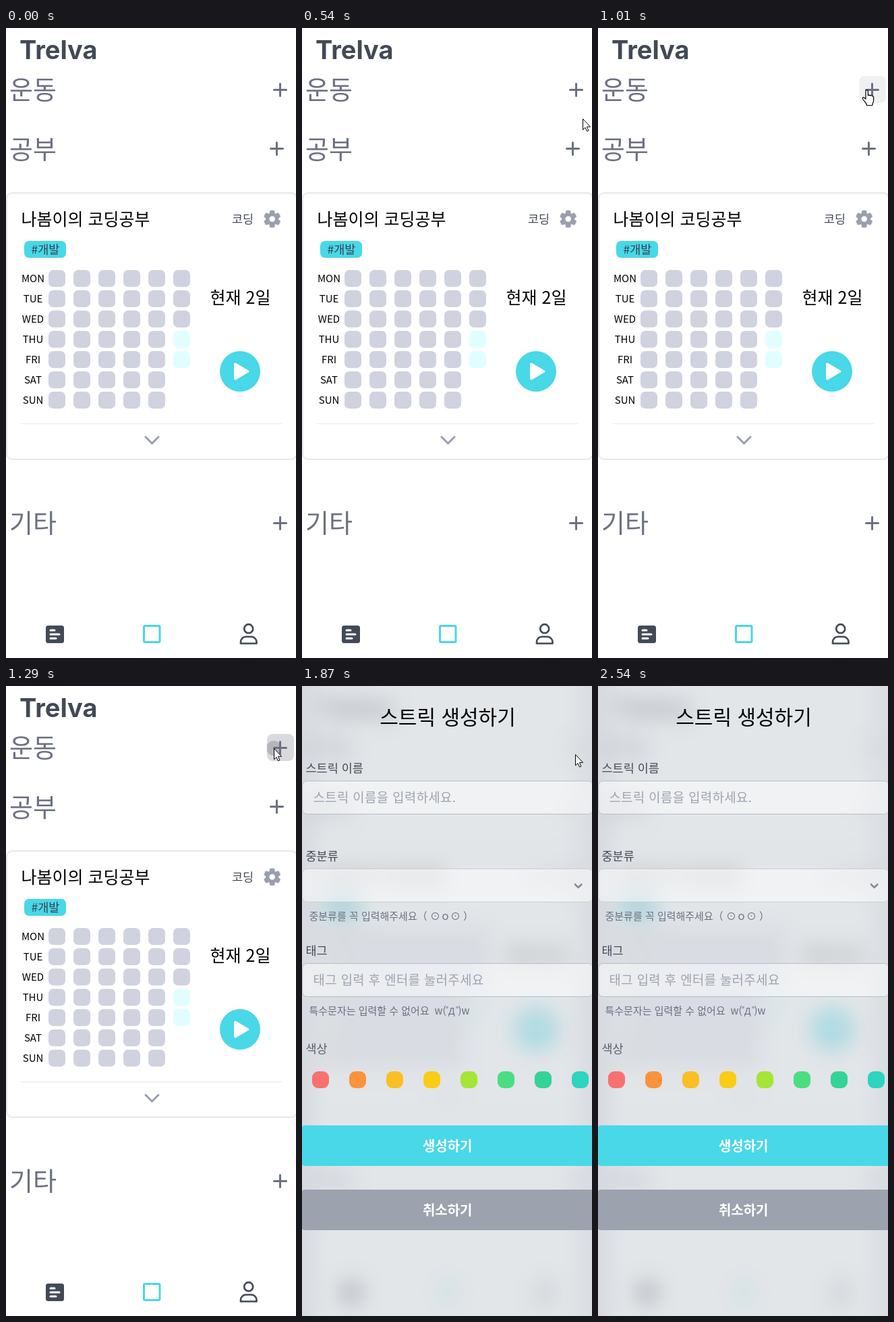
An HTML page for the animation above (3200 ms loop, 430x932 px).

```html
<!DOCTYPE html>
<html lang="ko">
<head>
<meta charset="utf-8">
<title>Trelva</title>
<style>
  html, body { margin: 0; width: 100%; height: 100%; overflow: hidden; background: #fff; }
  svg { display: block; width: 430px; height: 932px; }
  text { font-family: "Noto Sans CJK KR", "Noto Sans CJK", "Noto Sans", sans-serif; white-space: pre; }
  .brand { font-family: Inter, sans-serif; }
  .line { fill: none; stroke-linecap: round; stroke-linejoin: round; }
  .blurred { filter: blur(16px); }
</style>
</head>
<body>
<svg viewBox="0 0 430 932">
  <defs>
    <linearGradient id="edge">
      <stop offset="0" stop-color="#c8cbd4" stop-opacity=".45"/>
      <stop offset=".09" stop-color="#c8cbd4" stop-opacity="0"/>
      <stop offset=".9" stop-color="#c8cbd4" stop-opacity="0"/>
      <stop offset="1" stop-color="#c8cbd4" stop-opacity=".35"/>
    </linearGradient>
    <clipPath id="btn"><rect x="387" y="71" width="40" height="40" rx="8"/></clipPath>
  </defs>
  <g id="home"></g>
  <g id="form"></g>
  <g id="cursor" stroke="#000" stroke-linejoin="round" fill="#fff">
    <path id="arrow" d="M.5.5V16.6L4 13.3 6.5 18.8 8.9 17.8 6.5 12.2H11.6z"/>
    <path id="hand" stroke-width="1.2" d="M0 1.5a1.7 1.7 0 0 1 3.4 0V8a1.6 1.6 0 0 1 3 .3 1.6 1.6 0 0 1 3 .6 1.4 1.4 0 0 1 2.2 1V15c0 3-1.8 4-1.8 7.5H1.5c0-3-3-5-6-9.5-1-2 1-3.2 2.4-1.7L0 13z"/>
  </g>
</svg>
<script>
const $ = id => document.getElementById(id);
const CYAN = '#48d8e8', SLATE = '#6b7082', DARK = '#434956', MUTED = '#9a9fb0';

// Text is placed by the vertical centre of its glyphs.
const text = (x, mid, size, fill, str, more = '') =>
  `<text x="${x}" y="${mid + size * .37}" font-size="${size}" fill="${fill}" ${more}>${str}</text>`;
const rect = (x, y, w, h, r, fill, more = '') =>
  `<rect x="${x}" y="${y}" width="${w}" height="${h}" rx="${r}" fill="${fill}" ${more}/>`;
const line = (d, stroke, width) =>
  `<path class="line" d="${d}" stroke="${stroke}" stroke-width="${width}"/>`;
const plus = (x, y) => line(`M${x - 9} ${y}h18M${x} ${y - 9}v18`, SLATE, 3);
const middle = 'text-anchor="middle"';

function grid() {
  return ['MON', 'TUE', 'WED', 'THU', 'FRI', 'SAT', 'SUN'].map((day, row) => {
    const y = 358 + row * 30;
    let out = text(40, y + 12.5, 15, '#000', day, middle);
    for (let col = 0; col < (row < 5 ? 6 : 5); col++) {
      const fresh = col === 5 && row > 2;
      out += rect(63 + col * 37, y, 25, 25, 7, fresh ? '#e0feff' : '#d0d2df');
    }
    return out;
  }).join('');
}

const gear = `<g transform="translate(394.7 282.5)"><circle r="9.6" fill="${MUTED}"/>` +
  [0, 60, 120].map(a => rect(-3.8, -12.7, 7.6, 25.4, 2, MUTED, `transform="rotate(${a})"`)).join('') +
  '<circle r="4.2" fill="#fff"/></g>';

$('home').innerHTML =
  rect(-100, -100, 630, 1132, 0, '#fff') +
  `<text class="brand" x="20" y="45.5" font-size="38" font-weight="700" fill="${DARK}">Trelva</text>` +
  text(5, 91, 38, SLATE, '운동') + text(5, 179, 38, SLATE, '공부') + text(5, 732, 38, SLATE, '기타') +
  `<g id="press" clip-path="url(#btn)">${rect(387, 71, 40, 40, 8, '#f0f0f2', 'id="pad"')}` +
  '<circle id="ripple" cx="397" cy="92" fill="#b5b6ba"/></g>' +
  plus(406.5, 91.5) + plus(401.5, 178.5) + plus(406.5, 732.5) +
  rect(1, 244, 430, 394, 8, '#fff', 'stroke="#e5e7eb" stroke-width="2"') +
  text(22.5, 283, 25, '#000', '나봄이의 코딩공부', 'font-weight="500"') +
  text(335, 282.5, 17.5, DARK, '코딩') + gear +
  rect(27, 315, 62, 25, 7, CYAN) + text(37.5, 327.5, 17.5, '#374151', '#개발') +
  grid() +
  text(302.5, 398.5, 25, '#000', '현재 2일') +
  `<circle cx="347" cy="508" r="30" fill="${CYAN}"/>` +
  '<path d="M340 497.500V518.500L358 508z" fill="#fff" stroke="#fff" stroke-width="4" stroke-linejoin="round"/>' +
  rect(22, 585, 388, 1, 0, '#e5e7eb') +
  line('M207 605l9.500 9.500 9.500-9.500', MUTED, 3) +
  rect(59, 884, 27, 26, 3.5, DARK) + line('M66 891h6M66 897h13M66 903h8', '#fff', 3) +
  rect(204.5, 884.5, 23.5, 24, 1.5, 'none', `stroke="${CYAN}" stroke-width="3"`) +
  `<circle cx="359.7" cy="888.7" r="6.5" fill="none" stroke="${DARK}" stroke-width="2.7"/>` +
  line('M348 910.500v-2c0-5 4-8 8-8h7.500c4 0 8 3 8 8v2z', DARK, 2.7);

const field = (y, border) => rect(.5, y + .5, 431, 49, 7, '#fff', `fill-opacity=".5" stroke="${border}"`);
const button = (y, fill, label) => rect(0, y, 432, 60, 4, fill) +
  text(215.7, y + 30.5, 20, '#fff', label, middle + ' font-weight="700"');
const label = (y, str, fill = DARK) => text(5.5, y, 17.5, fill, str);
const hint = (x, y, str) => text(x, y, 15, SLATE, str, 'font-weight="500"');
const placeholder = (y, str) => text(16.5, y, 18.75, '#9ca3af', str, 'letter-spacing=".025em"');
const swatches = ['#f87171', '#fb923c', '#fbbf24', '#facc15', '#a3e635', '#4ade80', '#34d399', '#2dd4bf'];

$('form').innerHTML =
  rect(0, 0, 430, 932, 0, '#d1d5db', 'fill-opacity=".6"') +
  rect(0, 0, 430, 932, 0, 'url(#edge)') +
  text(216, 46, 30, '#000', '스트릭 생성하기', middle + ' font-weight="500"') +
  label(122, '스트릭 이름') + field(140, '#b3bfc9') + placeholder(165.5, '스트릭 이름을 입력하세요.') +
  label(252, '중분류') + field(270, '#c9cdd5') + line('M405 293.500l4.700 4.700 4.700-4.700', '#858a9a', 2.6) +
  hint(10.5, 340.5, '중분류를 꼭 입력해주세요（ ⊙ｏ⊙ ）') +
  label(392, '태그') + field(410, '#b3bfc9') + placeholder(435.5, '태그 입력 후 엔터를 눌러주세요') +
  hint(10.5, 480.5, '특수문자는 입력할 수 없어요') + hint(196.5, 480.5, 'w(') +
  text(213, 480.5, 14, SLATE, '˚<tspan x="217">Д</tspan><tspan x="228">˚</tspan>', 'style="font-family:\'Noto Sans\',sans-serif"') +
  hint(231.5, 480.5, ')w') +
  label(537, '색상', '#5a5f6e') +
  swatches.map((c, i) => rect(15 + i * 55, 570, 25, 25, 9, c)).join('') +
  button(650, CYAN, '생성하기') + button(745, '#9ca3af', '취소하기');

// [start ms, cursor shape, x, y, ripple radius]
const steps = [
  [0], [70, 'arrow', 421, 809], [140],
  [540, 'arrow', 416, 134], [610, 'arrow', 411, 119], [670, 'arrow', 404, 106],
  [740, 'hand', 398, 95], [810, 'hand', 393, 87], [870, 'hand', 390, 81],
  [940, 'hand', 394, 87], [1010, 'hand', 397, 92],
  [1210, 'hand', 397, 92, 5], [1290, 'arrow', 397, 92, 11],
  [1340, 'arrow', 397, 92], [1870, 'arrow', 405, 101], [1940, 'arrow', 419, 132], [2000],
  [2400, 'arrow', 373, 923], [2470, 'arrow', 384, 926], [2540]
];
const LOOP = 3200, FORM_AT = 1340;
const show = (id, on) => $(id).setAttribute('visibility', on ? 'visible' : 'hidden');

function draw(t) {
  const [, shape, x = 0, y = 0, r = 0] = steps.findLast(s => s[0] <= t);
  const open = t >= FORM_AT;
  $('home').setAttribute('class', open ? 'blurred' : '');
  show('form', open);
  show('arrow', shape === 'arrow');
  show('hand', shape === 'hand');
  $('cursor').setAttribute('transform', `translate(${x} ${y})`);
  show('press', shape === 'hand' || r > 0);
  $('pad').setAttribute('fill', r > 5 ? '#d9dade' : r ? '#e4e5e8' : '#f0f0f2');
  $('ripple').setAttribute('r', r);
}

const start = performance.now();
function tick() {
  draw((performance.now() - start) % LOOP);
  requestAnimationFrame(tick);
}
tick();
</script>
</body>
</html>
```
